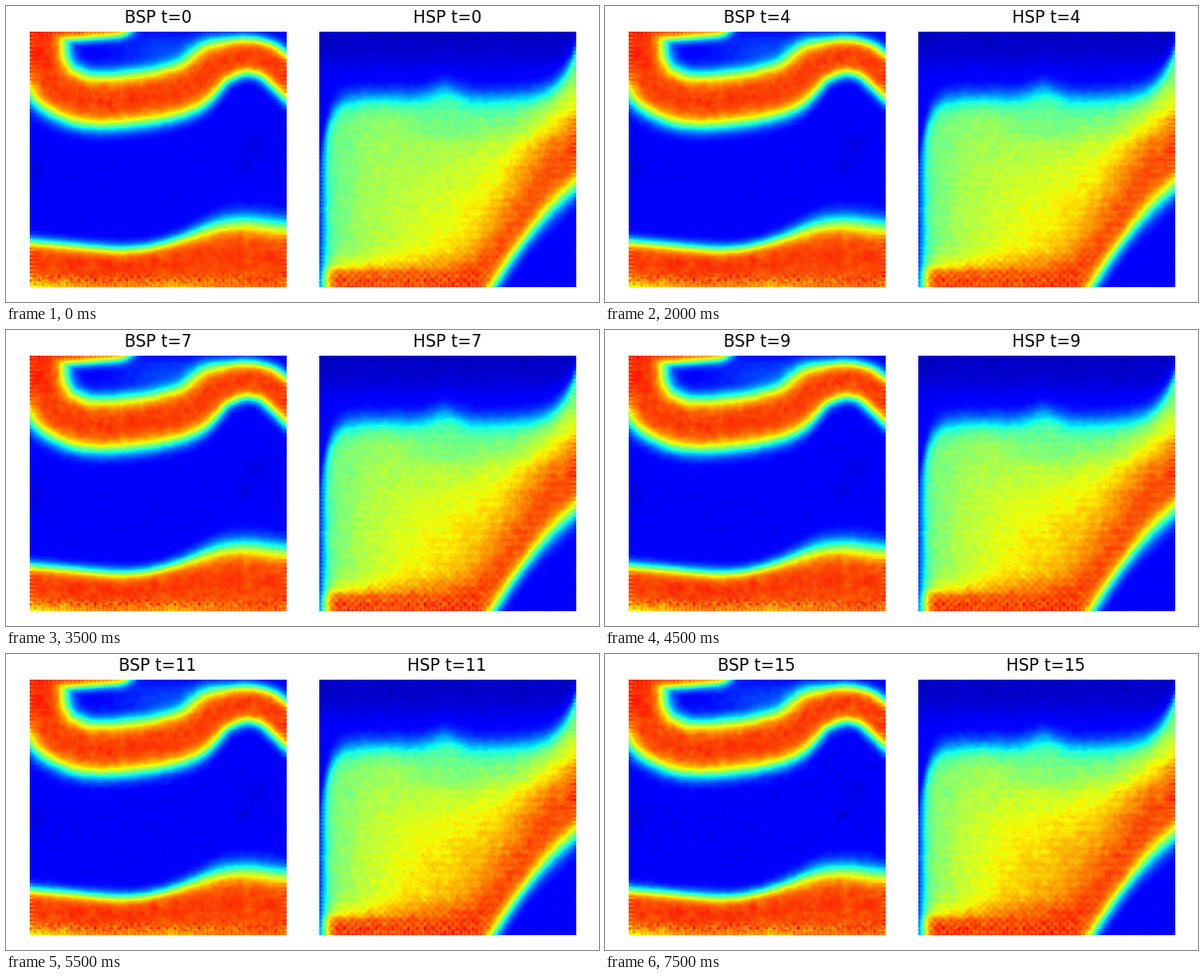
A matplotlib script for the animation above (8000 ms loop, 600x300 px).

```python
import numpy as np
import matplotlib.pyplot as plt
from matplotlib.animation import FuncAnimation

W, H, DPI = 600, 300, 100
N, SIZE, TOP = 128, 259.5, 25.5
FRAMES, STEP = 16, 500
LEFT_X, RIGHT_X = 24, 316.5
BLUE = 0.108

rng = np.random.default_rng(12)
cell = (np.arange(N) + 0.5) * SIZE / N
row, col = np.mgrid[0:N, 0:N]


def sig(v):
    return 1 / (1 + np.exp(-np.clip(v, -40, 40)))


def grid(x0):
    return np.meshgrid(x0 + cell, TOP + cell)


def curve(points):
    """Smooth open curve through the neighbourhood of a few key points."""
    p = np.array(points, float)
    for _ in range(4):
        a, b = p[:-1], p[1:]
        mid = np.stack([0.8 * a + 0.2 * b, 0.2 * a + 0.8 * b], 1)
        p = np.vstack([p[:1], mid.reshape(-1, 2), p[-1:]])
    s = np.r_[0, np.cumsum(np.hypot(*np.diff(p, axis=0).T))]
    u = np.arange(0, s[-1], 1.0)
    return np.c_[np.interp(u, s, p[:, 0]), np.interp(u, s, p[:, 1])]


def distance(c, X, Y):
    return np.sqrt(np.min((X[..., None] - c[:, 0]) ** 2
                          + (Y[..., None] - c[:, 1]) ** 2, axis=-1))


def blur(a, n):
    for _ in range(n):
        p = np.pad(a, 1, mode="edge")
        a = (p[:-2, 1:-1] + p[2:, 1:-1] + p[1:-1, :-2] + p[1:-1, 2:]
             + 2 * a) / 6
    return a


def noise(n=0):
    a = blur(rng.standard_normal((N, N)), n)
    return a / a.std()


def spot(X, Y, x, y, rx, ry):
    return np.exp(-((X - x) / rx) ** 2 - ((Y - y) / ry) ** 2)


# Upsampling texture: fine lattice, stronger at the borders
lattice = np.cos(np.pi * col) * np.cos(np.pi * row)
lattice4 = np.cos(np.pi * col / 2) * np.cos(np.pi * row / 2)
side = np.exp(-np.minimum(col, N - 1 - col) / 1.6)
ends = np.exp(-np.minimum(row, N - 1 - row) / 2)
floor = np.exp(-((N - 4 - row) / 2.6) ** 2)


def texture():
    return (0.008 * noise() + 0.009 * noise(3) + 0.005 * lattice
            + 0.045 * side * np.cos(np.pi * row)
            + 0.035 * ends * np.cos(np.pi * col))


# Left map: soft strokes around three centre lines
X, Y = grid(LEFT_X)
wave = curve([(36, 5), (34, 55), (48, 82), (75, 95), (100, 97), (150, 92),
              (190, 81), (214, 58), (242, 50), (266, 55), (296, 84)])
finger = curve([(38, 12), (110, 6)])
bed = curve([(15, 256), (60, 260), (125, 266), (185, 255), (235, 250),
             (295, 258)])

half = 25.5 - 8 * sig((X - 212) / 10)
upper = sig(5.2 * (1 - distance(wave, X, Y) / half))
tongue = sig(9 * (1 - distance(finger, X, Y) / 25))
depth = Y - np.interp(X, bed[:, 0], bed[:, 1])
half = 18 + 15 * sig((X - 195) / 14)
lower = sig(5.2 * (1 - np.where(depth > 0, 0.55 * depth, -depth) / half))
warm = np.maximum.reduce([upper, tongue, lower])

blotch = sum(spot(X, Y, *s) for s in
             [(252, 141, 13, 11), (242, 163, 9, 7), (33, 165, 5, 14)])
left_base = (BLUE + (0.85 - BLUE) * warm
             + 0.03 * spot(X, Y, 30, 35, 25, 25)
             + 0.07 * spot(X, Y, 155, 42, 45, 16) * (1 - warm)
             - 0.02 * blotch * (1 - warm))
left_tex = texture() + 0.05 * floor * (lattice4 + 0.8 * noise())
left_tex = left_tex * (0.25 + 0.75 * warm)
left_drift = 0.006 * noise(2)

# Right map: warm body under a dark sky, cut by a curved slope
X, Y = grid(RIGHT_X)
u = (X - 492) / 85
slope = (140 - 74 * u) / 85
rise = (285 - 140 * u + 37 * u ** 2 - Y) / np.sqrt(1 + slope ** 2)
land = sig(rise / (3.8 + 2 * sig((X - 545) / 10)))
ridge = sig((28 + 0.3 * np.maximum(220 - Y, 0) - rise) / 8)

edge = (94 - 9 * np.exp(-((X - 443) / 18) ** 2)
        - 55 * np.exp((X - 577) / 16) + 40 * np.exp((321 - X) / 9))
body = sig((Y - edge) / 6.5) * sig((X - 321.5) / 3.2)
sky = 0.06 + 0.052 * sig((Y - 58) / 8)

ramp = np.clip((X - 330) / 200, 0, 1) * np.clip((Y - 110) / 150, 0, 1)
plateau = (0.48 + 0.05 * sig((X - 352) / 9) + 0.24 * ramp
           - 0.05 * sig((X - 410) / 8) * sig((135 - Y) / 4)
           + 0.07 * sig((Y - 253) / 4))
strip = sig((Y - 266) / 2.5)
plateau = plateau + (np.maximum(plateau, 0.82) - plateau) * strip
gain = (sig((Y - 150) / 12) * (0.35 + 0.65 * sig((X - 385) / 12))
        * (1 - strip) + 0.25 * sig((Y - 105) / 5))

solid = body * land
right_tex = (texture() + 0.008 * np.cos(np.pi * row) * sig((40 - Y) / 4)
             + solid * (0.008 * noise() + 0.008 * np.cos(np.pi * row / 2)
                        + 0.02 * lattice4 * sig((Y - 245) / 4)
                        + 0.04 * floor * (lattice4 + 0.6 * noise())))
right_tex = right_tex * (0.3 + 0.7 * solid)
right_drift = 0.006 * noise(2) * (0.3 + 0.7 * solid)


def left_map(t):
    return left_base + left_tex + left_drift * t / (FRAMES - 1)


def right_map(t):
    k = t / (FRAMES - 1)
    v = plateau + 0.06 * k * gain
    v = v + (np.maximum(v, 0.85) - v) * ridge
    v = sky + (v - sky) * body
    v = BLUE + (v - BLUE) * land
    return v + right_tex + right_drift * k


fig = plt.figure(figsize=(W / DPI, H / DPI), dpi=DPI, facecolor="white")


def panel(x0, data):
    ax = fig.add_axes([x0 / W, 1 - (TOP + SIZE) / H, SIZE / W, SIZE / H])
    ax.axis("off")
    return ax, ax.imshow(data, cmap="jet", vmin=0, vmax=1, aspect="auto")


ax_l, im_l = panel(LEFT_X, left_map(0))
ax_r, im_r = panel(RIGHT_X, right_map(0))


def draw(t):
    im_l.set_data(left_map(t))
    im_r.set_data(right_map(t))
    ax_l.set_title(f"BSP t={t}", fontsize=12)
    ax_r.set_title(f"HSP t={t}", fontsize=12)
    return im_l, im_r


anim = FuncAnimation(fig, draw, frames=FRAMES, interval=STEP, repeat=True,
                     repeat_delay=0, blit=False)
plt.show()
```
